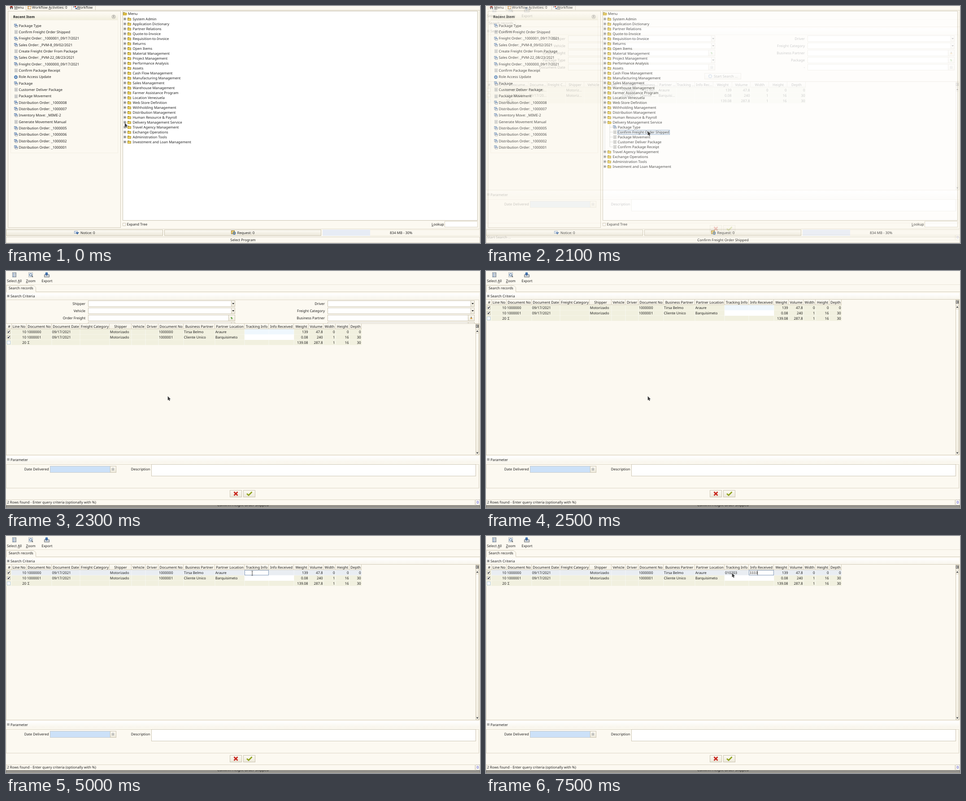
An HTML page with a canvas that plays this animation: 1057x530 px, repeating every 8000 ms.

```html
<!DOCTYPE html>
<html lang="en">
<head>
<meta charset="utf-8">
<title>Order shipping</title>
<style>
html, body { margin: 0; width: 100%; height: 100%; overflow: hidden; background: #fcf9f2; }
canvas { display: block; }
</style>
</head>
<body>
<canvas id="stage" width="1057" height="530"></canvas>
<script>
const W = 1057, H = 530, LOOP = 8000, STEP = 100;
const BG = '#fcf9f1', EDGE = '#d3ccba', INK = '#202020', ROW = '#f1f0df';
const screen = document.getElementById('stage').getContext('2d');
const layer = document.createElement('canvas');
layer.width = W; layer.height = H;
let g = screen;

// Drawing helpers
function fill(x, y, w, h, color) { g.fillStyle = color; g.fillRect(x, y, w, h); }
function frame(x, y, w, h, color = EDGE) {
  g.strokeStyle = color; g.lineWidth = 1;
  g.strokeRect(x + .5, y + .5, w - 1, h - 1);
}
function box(x, y, w, h, color, edge) { fill(x, y, w, h, color); frame(x, y, w, h, edge); }
function poly(points, color) {
  g.beginPath();
  points.forEach(([x, y]) => g.lineTo(x, y));
  g.closePath(); g.fillStyle = color; g.fill();
}
function line(points, color, width = 1) {
  g.beginPath();
  points.forEach(([x, y], i) => i ? g.lineTo(x, y) : g.moveTo(x, y));
  g.strokeStyle = color; g.lineWidth = width; g.stroke();
}
function ring(x, y, r, color, width = 1) {
  g.beginPath(); g.arc(x, y, r, 0, 7);
  g.strokeStyle = color; g.lineWidth = width; g.stroke();
}
function shade(x, y, w, h, from, to) {
  const s = g.createLinearGradient(0, y, 0, y + h);
  s.addColorStop(0, from); s.addColorStop(1, to);
  fill(x, y, w, h, s);
}
function setFont(bold) {
  g.font = (bold ? 'bold ' : '') + '7.9px "Noto Sans", sans-serif';
  g.textRendering = 'geometricPrecision';
}
function text(str, x, y, align = 'left', color = INK, bold = false) {
  setFont(bold);
  g.textAlign = align; g.fillStyle = color;
  g.fillText(str, x, y + 2.8);
}
function mnemonic(str, x, y, index) {
  text(str, x, y);
  const from = x + g.measureText(str.slice(0, index)).width;
  fill(from, y + 3.8, g.measureText(str[index]).width, .7, INK);
}
function button(x, y, w, h) { shade(x, y, w, h, '#fdfbf5', '#ece8da'); frame(x, y, w, h, '#cbc4b0'); }
function triangle(x, y, dir) {
  poly([[x - 2.5, y - 1.2 * dir], [x + 2.5, y - 1.2 * dir], [x, y + 1.6 * dir]], '#111');
}

// Icons, centred on x, y
function windowIcon(x, y) {
  box(x - 4, y - 4, 6, 6, '#eef0f2', '#a9b0b8');
  fill(x - 4, y - 4, 6, 1.5, '#5b82b4');
  box(x - 2, y - 1, 6, 5, '#f6f7f8', '#8d959e');
  fill(x - 2, y - 1, 6, 1.6, '#41699f');
}
function processIcon(x, y) {
  box(x - 3, y - 4, 7, 8, '#f0f0ee', '#c2c2bf');
  for (let i = 0; i < 3; i++) fill(x - 1.5, y - 2 + i * 1.8, 4, .8, '#8e9093');
}
function gearIcon(x, y) {
  ring(x, y, 2.5, '#3f72b0', 1.8);
  for (let i = 0; i < 8; i++) {
    const a = i * Math.PI / 4;
    fill(x + 3.6 * Math.cos(a) - .6, y + 3.6 * Math.sin(a) - .6, 1.2, 1.2, '#3f72b0');
  }
}
function folderIcon(x, y, open) {
  fill(x - 4, y - 3, 4, 2, '#a8923a');
  box(x - 4, y - 2, 8, 5.5, '#f0d45c', '#a8923a');
  if (open) poly([[x - 4, y + 4], [x - 2, y], [x + 5.5, y], [x + 3.5, y + 4]], '#d9b93e');
}
function expander(x, y, open) {
  box(x - 2.5, y - 2.5, 5, 5, '#fff', '#8c8c88');
  fill(x - 1.3, y - .4, 2.6, .8, '#222');
  if (!open) fill(x - .4, y - 1.3, .8, 2.6, '#222');
}
function lookupIcon(x, y, kind) {
  if (kind === 'product') {
    line([[x - 2.5, y - 1], [x, y - 1], [x, y + 2]], '#4f9a32', 1.6);
    poly([[x - 2, y + 1], [x + 2.4, y + 1], [x, y + 3]], '#4f9a32');
  } else if (kind === 'partner') {
    fill(x - 1, y - 2.5, 2, 2.2, '#5b5348'); fill(x - 2, y, 4, 2.3, '#d99b35');
  } else {
    box(x - 2.5, y - 2.5, 5, 5.5, '#f3f3f1', '#a5a5a1');
    fill(x - 1.3, y, 2.8, 1, '#9a9a98');
  }
}

const RECENT = `w Package Type
p Confirm Freight Order Shipped
w Freight Order: _1000001_09/17/2021
w Sales Order: _PVM-8_09/02/2021
p Create Freight Order From Package
w Sales Order: _PVM-22_08/23/2021
w Freight Order: _1000000_09/17/2021
p Confirm Package Receipt
g Role Access Update
w Package
p Customer Deliver Package
p Package Movement
w Distribution Order: _1000008
w Distribution Order: _1000007
w Inventory Move: _MIME-2
p Generate Movement Manual
w Distribution Order: _1000005
w Distribution Order: _1000006
w Distribution Order: _1000002
w Distribution Order: _1000001`.split('\n');
const TREE = ('System Admin|Application Dictionary|Partner Relations|Quote-to-Invoice|' +
  'Requisition-to-Invoice|Returns|Open Items|Material Management|Project Management|' +
  'Performance Analysis|Assets|Cash Flow Management|Manufacturing Management|Sales Management|' +
  'Warehouse Management|Farmer Assistance Program|Location Venezuela|Web Store Definition|' +
  'Withholding Management|Distribution Management|Human Resource & Payroll|' +
  'Delivery Management Service|Travel Agency Management|Exchange Operations|' +
  'Administration Tools|Investment and Loan Management').split('|');
const OPENED = 21;
const CHILDREN = ['Package Type', 'Confirm Freight Order Shipped', 'Package Movement',
  'Customer Deliver Package', 'Confirm Package Receipt'];
const ICONS = { w: windowIcon, p: processIcon, g: gearIcon };

function drawTree(t) {
  const open = t >= 400;
  folderIcon(265, 17, true);
  text('Menu', 272, 17.5);
  fill(264.7, 22, .7, 277 + (open ? 55 : 0), '#d2d2ce');
  TREE.forEach((name, i) => {
    const y = 29 + 11 * (i + (open && i > OPENED ? CHILDREN.length : 0));
    const isOpen = open && i === OPENED;
    fill(267, y - .3, 5, .7, '#c4c4c0');
    expander(265, y, isOpen);
    folderIcon(275, y, isOpen);
    text(name, 282.5, y - .2);
  });
  if (!open) return;
  fill(275.7, 265, .7, 50, '#c4c4c0');
  CHILDREN.forEach((name, i) => {
    const y = 271 + 11 * i;
    fill(276, y - .3, 8, .7, '#c4c4c0');
    (i ? processIcon : windowIcon)(287, y);
    if (i === 1 && t >= 1800) box(293, y - 5, 117, 11, '#e5edf6', '#8ba6c4');
    text(name, 293.8, y);
  });
}

function drawMenu(t) {
  fill(0, 0, W, H, BG);
  // Tabs
  fill(44, 9, W - 44, 1, EDGE);
  [4, 44, 146, 199].forEach(x => fill(x, 0, 1, 9, EDGE));
  poly([[7.5, 3], [12, -1], [16.5, 3]], '#a8322c');
  fill(9, 3, 6, 4, '#5d5a55'); fill(11, 4, 2, 3, '#eee');
  mnemonic('Menu', 18.5, 3, 0);
  box(48, -1, 8, 8, '#fff7e8', '#c28c45'); fill(48, -1, 8, 2, '#d08b3c'); fill(50, 1, 1, 6, '#c28c45');
  mnemonic('Workflow Activities: 0', 58, 3, 9);
  fill(153, 0, 3, 3, '#c23b2c'); fill(150, 1, 2, 2, '#3c65a0'); fill(155, 4, 3, 3, '#3c65a0');
  mnemonic('Workflow', 158.3, 3, 0);

  // Recent items
  frame(4, 11, 252, 485);
  shade(10, 17, 240, 14, '#fcf9f1', '#f1eedd');
  frame(10, 31, 240, 298, '#f3efe4');
  text('Recent Item', 16, 24, 'left', INK, true);
  ring(240, 24, 4, '#9c9a94', .8);
  [-.2, 2.3].forEach(d => line([[238.3, 23.5 + d], [240, 21.8 + d], [241.7, 23.5 + d]], '#333', .8));
  RECENT.forEach((item, i) => {
    const y = 44 + 14.32 * i;
    ICONS[item[0]](22, Math.round(y));
    text(item.slice(2), 28.5, y);
  });

  // Tree
  box(260, 11, 792, 469, '#fff', '#c9c2b1');
  drawTree(t);
  box(260, 485, 7, 7, '#fdfcf8', '#cfc8b8');
  text('Expand Tree', 269.5, 488.3);
  mnemonic('Lookup', 949, 488.3, 0);
  box(978, 481, 74, 14, '#fff', '#d9d2c0');
  frame(1055, 10, 1, 489, '#e1dbcb');

  // Footer
  fill(0, 498, W, 1, '#e2dccd');
  button(0, 500, 350, 14);
  button(353, 500, 350, 14);
  box(706, 500, 351, 14, '#fbf8f0', '#ede8da');
  fill(706, 500, 106, 14, '#e7ecf5');
  box(152, 503, 8, 6, '#e8eef7', '#8fa3be');
  poly([[155, 506], [163, 506], [159, 511]], '#3d69a4');
  text('Notice: 0', 166, 506.7);
  box(502, 502, 8, 8, '#f1d06d', '#977b36');
  ring(509, 508, 2.6, '#4b78b0', 1.6);
  text('Request: 0', 515.5, 506.7);
  text('834 MB - 30%', 881, 506.7, 'center');
  frame(0, 516, W, 14, '#d9d3c3');
  text(t < 1800 ? 'Select Program' : 'Confirm Freight Order Shipped', 528.5, 522.7, 'center');
}

// Result table: [title, align, first row, second row, totals]
const COLUMNS = [
  ['Line No', 'r', '10', '10', '20'],
  ['Document No', 'l', '1000000', '1000001', 'Σ'],
  ['Document Date', 'l', '09/17/2021', '09/17/2021', ''],
  ['Freight Category', 'l', '', '', ''],
  ['Shipper', 'l', 'Motorizado', 'Motorizado', ''],
  ['Vehicle', 'l', '', '', ''],
  ['Driver', 'l', '', '', ''],
  ['Document No', 'l', '1000000', '1000001', ''],
  ['Business Partner', 'l', 'Tirsa Belmo', 'Cliente Unico', ''],
  ['Partner Location', 'l', 'Araure', 'Barquisimeto', ''],
  ['Tracking Info', 'l', '', '', ''],
  ['Info Received', 'l', '', '', ''],
  ['Weight', 'r', '139', '0.08', '139.08'],
  ['Volume', 'r', '47.8', '240', '287.8'],
  ['Width', 'r', '0', '1', '1'],
  ['Height', 'r', '0', '16', '16'],
  ['Depth', 'r', '0', '30', '30']
];
const PACKED = [12, 46, 102, 165, 231, 280, 311, 340, 396, 466, 532, 586, 642, 675, 708, 735, 766, 793];
const EVEN = PACKED.map((_, i) => Math.round(13 + 41.2 * i));
const TRACKING = 10, RECEIVED = 11;

function shorten(str, width) {
  setFont(false);
  if (g.measureText(str).width <= width) return str;
  while (str && g.measureText(str + '...').width > width) str = str.slice(0, -1);
  return str + '...';
}

// Typed keys: [time, characters shown]
const TYPED = [
  { text: '010203', keys: [[5300, 2], [5600, 4], [5700, 5], [5900, 6]] },
  { text: '3333', keys: [[7100, 1], [7200, 2], [7300, 3], [7500, 4]] }
];
function typed(i, t) {
  const { text: str, keys } = TYPED[i];
  return str.slice(0, keys.reduce((n, [at, count]) => t >= at ? count : n, 0));
}

function drawEditors(t, y) {
  const active = t >= 6300 ? 1 : t >= 4300 ? 0 : -1;
  [0, 1].forEach(i => {
    const x = PACKED[TRACKING + i], str = typed(i, t);
    if (i === active) box(x, y, (i ? 56 : 54), 12, '#fff', '#7f97b5');
    text(str, x + (i ? 1.4 : .9), y + 6);
    const blinkOff = i === 0 && t >= 5000 && t < 5300;
    if (i === active && !blinkOff) fill(x + 1.2 + g.measureText(str).width, y + 1.5, .8, 10, '#222');
  });
}

function drawTable(t, top) {
  const packed = t >= 2300, edges = packed ? PACKED : EVEN, last = edges[COLUMNS.length];
  const selected = t >= 4200;
  shade(0, top, last, 12, '#fdfbf5', '#f4f0e4');
  fill(0, top + 12, last, 36, ROW);
  if (selected) fill(12, top + 12, last - 12, 12, '#e9edf2');
  if (packed) {
    if (!selected) fill(532, top + 12, 110, 12, '#eff7fd');
    fill(532, top + 24, 110, 12, '#fff');
  }
  COLUMNS.forEach(([title, align, ...cells], c) => {
    const x = edges[c], end = edges[c + 1];
    fill(x - .5, top + 12, 1, 36, 'rgba(255,255,255,.5)');
    fill(end - 1, top, 1, 12, '#d6cfbd');
    text(shorten(title, end - x - 1), (x + end) / 2, top + 6, 'center');
    cells.forEach((cell, r) => {
      const shown = shorten(cell, end - x - 2), y = top + 18 + 12 * r;
      if (align === 'r') text(shown, end - (c ? 1.4 : .7), y, 'right');
      else text(shown, x + (cell === 'Σ' ? 2 : .8), y);
    });
  });
  for (let r = 1; r < 4; r++) fill(0, top + 12 * r + 11.5, last, .6, 'rgba(255,255,255,.5)');
  fill(0, top + 11, last, 1, '#d9d2c0');
  fill(12, top, 1, 12, '#d6cfbd');
  text('#', 7, top + 6, 'center');
  for (let r = 0; r < 3; r++) {
    const y = top + 18 + 12 * r;
    box(2, y - 4, 8, 8, '#fff', r < 2 ? '#bdb7a6' : '#b9cfe4');
    if (r < 2 && packed) line([[4, y - .3], [5.4, y + 1.6], [8, y - 2]], '#111', 1.3);
  }
  if (packed) drawEditors(t, top + 12);

  // Scroll bar
  box(1047, top, 8, 411 - top, '#f8f5ec', '#cfc8b6');
  box(1048, top + 2, 6, 7, '#fff', '#55534e');
  fill(1050, top + 4, 3, 1, '#222'); fill(1050, top + 6, 3, 1, '#222');
  box(1047, top + 12, 8, 9, '#faf8f1', '#cfc8b6');
  triangle(1051, top + 16.5, -1);
  shade(1048, top + 22, 6, 380 - top, '#fdfbf5', '#f3efe3');
  box(1047, 403, 8, 8, '#faf8f1', '#cfc8b6');
  triangle(1051, 407, 1);
}

const CRITERIA = [
  ['Shipper', 'list', 'Driver', 'list'],
  ['Vehicle', 'list', 'Freight Category', 'list'],
  ['Order Freight', 'product', 'Business Partner', 'partner'],
  ['Package Type', 'list', 'Package', 'product'],
  ['Document Date', 'date', '-', 'date']
];
function field(label, kind, x, y) {
  text(label, x - 6, y, 'right');
  box(x, y - 7, 328, 14, '#fff', '#cdc6b4');
  const w = kind === 'list' ? 9 : 15;
  button(x + 328 - w, y - 7, w, 14);
  if (kind === 'list') triangle(x + 323.7, y, 1);
  else lookupIcon(x + 320.5, y, kind);
}
function drawCriteria(height) {
  g.save();
  g.beginPath(); g.rect(0, 63, W, height); g.clip();
  frame(0, 64, 1055, 105, '#ddd6c6');
  CRITERIA.forEach(([left, leftKind, right, rightKind], i) => {
    field(left, leftKind, 183, 73 + 16 * i);
    field(right, rightKind, 717, 73 + 16 * i);
  });
  button(487, 150, 82, 14);
  ring(500, 157, 3.4, '#6f93bd', 1.6);
  text('Start Search ...', 508, 157);
  g.restore();
}

function drawToolbar() {
  box(14, 3, 9, 11, '#e6eaee', '#7d8894');
  [5, 8, 11].forEach(y => { fill(16, y, 2, 1.5, '#4c76ac'); fill(19, y, 3, 1, '#7a8088'); });
  box(50, 3, 10, 11, '#f2f3f3', '#b5b9bc');
  ring(55, 8.5, 2.7, '#5f83ad', 1.2);
  line([[57, 10.5], [60, 13.5]], '#55585c', 1.5);
  box(85, 8, 12, 6, '#d5d9dc', '#6b7075');
  fill(88, 3, 5, 4, '#4e7bb2');
  poly([[86.5, 6], [94.5, 6], [90.5, 11]], '#3d6aa4');
  mnemonic('Select All', 2, 22.5, 7);
  mnemonic('Zoom', 44.5, 22.5, 0);
  text('Export', 79.3, 22.5);
}

function drawDialog(t, offset) {
  const bottom = 524;
  g.clearRect(0, 0, W, H);
  fill(0, 0, W, bottom, BG);
  drawToolbar();
  fill(0, 30, W, 1, '#e9e4d7');
  line([[.5, 47], [.5, 32.5], [62, 32.5], [66.5, 37], [66.5, 46.5], [W, 46.5]], EDGE);
  text('Search records', 6, 38.5);

  shade(0, 50, 1055, 13, '#ffffff', '#f8f5ec');
  expander(5, 56, offset > 100);
  text('Search Criteria', 10, 56);
  if (offset) drawCriteria(offset);
  const top = 64 + offset;
  frame(0, top - 1, 1056, 413 - top, '#d3ccba');
  drawTable(t, top);

  // Parameters
  shade(0, 414, 1055, 15, '#ffffff', '#f8f5ec');
  expander(5, 421.5, true);
  text('Parameter', 10, 421.7);
  frame(0, 432, 1055, 54, '#ddd6c6');
  text('Date Delivered', 95.5, 443, 'right');
  box(98, 436, 135, 15, '#cce1f8', '#c3c9cc');
  button(232, 436, 14, 15);
  lookupIcon(238.5, 443, 'date');
  text('Description', 321.3, 443, 'right');
  box(324, 432, 724, 27, '#fff', '#cdc6b4');

  button(499, 490, 27, 16);
  [[-1, 1], [1, -1]].forEach(([a, b]) =>
    line([[512.5 + 4 * a, 494], [512.5 + 4 * b, 502]], '#c9291f', 2.8));
  button(529, 490, 27, 16);
  line([[537, 498], [541, 501.5], [548.5, 494]], '#8fa31e', 2.8);

  frame(0, 511, 1046, 13, '#ddd6c6');
  text(t < 2300 ? 'Start Search ...' : '2 Rows found - Enter query criteria (optionally with %)', 2.3, 517.3);
  box(1047, 511, 10, 13, '#fbf9f3', '#c9c5bc');
  text('0', 1052, 517.3, 'center', '#2a2ad0');
}

// Pointer moves: [start, end, x, y]
const MOVES = [[900, 1500, 360.7, 280], [2900, 3000, 533, 126.5], [3100, 3500, 320, 112],
  [3600, 3800, 594, 84.5], [4000, 4100, 548.6, 83]];
function pointerAt(t) {
  let x = 264.8, y = 261.5;
  for (const [start, end, toX, toY] of MOVES) {
    const k = Math.min(1, Math.max(0, (t - start) / (end - start)));
    const ease = k * k * (3 - 2 * k);
    x += (toX - x) * ease; y += (toY - y) * ease;
  }
  return [x, y];
}
function drawPointer(t) {
  const [x, y] = pointerAt(t);
  if (t >= 4300 && t < 6300) {
    if (t < 4700) return;
    fill(548.6, 78.5, .9, 9.5, '#222');
    fill(547.4, 78, 3.3, .8, '#444'); fill(547.4, 87.7, 3.3, .8, '#444');
    return;
  }
  const shape = [[0, 0], [0, 9.2], [2, 7.5], [3.5, 10.6], [5.1, 9.8], [3.8, 7], [6.4, 6.6]]
    .map(([dx, dy]) => [x + dx, y + dy]);
  line([...shape, shape[0]], 'rgba(255,255,255,.6)', 1);
  poly(shape, '#3b3b3b');
}

const FADE = { 2100: .22, 2200: .75 };
const COLLAPSE = { 2300: 54, 2400: 10 };

function draw(now) {
  const t = Math.floor((now % LOOP) / STEP) * STEP;
  drawMenu(t);
  if (t >= 2100) {
    const alpha = FADE[t] || 1;
    g = layer.getContext('2d');
    drawDialog(t, t < 2300 ? 106 : COLLAPSE[t] || 0);
    g = screen;
    g.globalAlpha = alpha;
    if (alpha > .5) shade(0, 523, W, 7, 'rgba(0,0,0,.55)', 'rgba(0,0,0,.3)');
    g.drawImage(layer, 0, 0);
    g.globalAlpha = 1;
  }
  drawPointer(t);
}

const begin = performance.now();
function tick() {
  draw(performance.now() - begin);
  requestAnimationFrame(tick);
}
tick();
</script>
</body>
</html>
```
